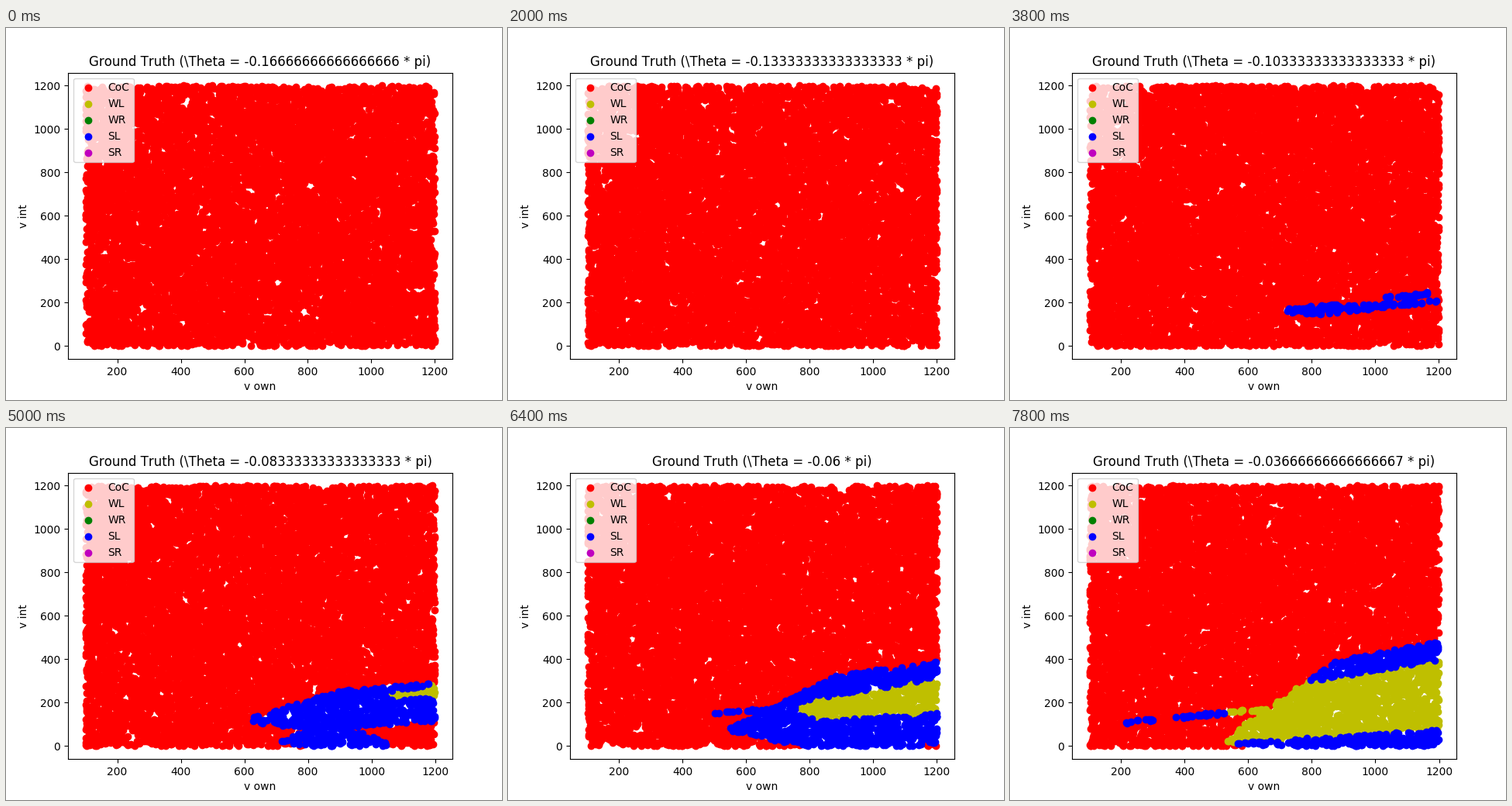
Write a matplotlib script that moves like this. It is 640 px wide and 480 px high and loops after 8 s.

```python
import numpy as np
import matplotlib.pyplot as plt
from matplotlib.animation import FuncAnimation

FRAMES, STEP_MS, POINTS = 40, 200, 10000
MARGIN = 0.05

plt.rcParams["text.kerning_factor"] = 6


def above(v):
    return np.maximum(v, 0)


def main_zone(k, x, y):
    """Alert wedge: steep edge from its tip, then a gentle slope after a knee."""
    t = (k - 19) / 20
    tip = 524 + 190 * (1 - t) ** 2
    rise = 170 - 130 * t + (0.2 + 0.8 * t) * (x - tip)
    knee = 192 + 198 * t + (0.05 + 0.23 * t) * (x - 860)
    floor = (145 - 240 * t + (0.1 + 0.3 * t) * above(830 - x)
             + 0.17 * (1 - t) * above(x - 830))
    return (x > tip) & (y < np.minimum(rise, knee)) & (y > floor)


def sliver(k, x, y):
    """Thin streak that widens sideways until the wedge swallows it."""
    line = 222 + 0.14 * (x - 1015)
    return (abs(x - 1095) < 40 * (k - 17)) & (abs(y - line) < 5)


def lower_lobe(k, x, y):
    """Parabolic bump growing from the bottom edge."""
    s = np.clip((k - 21) / 4, 0.01, 1.5)
    top = 80 * s * (1 - ((x - 875) / (190 * s)) ** 2)
    return (y < top) & (y > 0.25 * (800 - x))


def weak_zone(k, x, y):
    """Wedge opening leftwards inside the alert zone."""
    w = (k - 25) / 14
    tip = 985 - 455 * w
    top = 235 + 113 * w * w + 0.25 * (x - 1000)
    low = 206 - 148 * w + 0.1 * (x - 1000) + (1 - w) * above(tip + 80 - x)
    return (x > tip) & (y < top) & (y > low)


def sample(k):
    rng = np.random.default_rng(100 + k)
    x = rng.uniform(100, 1200, POINTS)
    y = rng.uniform(0, 1200, POINTS)
    core = main_zone(k, x, y) | sliver(k, x, y)
    weak = core & weak_zone(k, x, y)
    strong = (core | lower_lobe(k, x, y)) & ~weak
    return np.column_stack([x, y]), weak, strong


fig, ax = plt.subplots(figsize=(6.4, 4.8), dpi=100)
sets = {name: ax.scatter([], [], c=color, label=name)
        for name, color in zip(["CoC", "WL", "WR", "SL", "SR"], "rygbm")}
ax.set(xlabel="v own", ylabel="v int")
ax.legend(loc="upper left")
title = ax.set_title("")


def draw(k):
    pts, weak, strong = sample(k)
    sets["CoC"].set_offsets(pts[~(weak | strong)])
    sets["WL"].set_offsets(pts[weak])
    sets["SL"].set_offsets(pts[strong])
    low, high = pts.min(axis=0), pts.max(axis=0)
    pad = MARGIN * (high - low)
    ax.set(xlim=(low[0] - pad[0], high[0] + pad[0]),
           ylim=(low[1] - pad[1], high[1] + pad[1]))
    title.set_text(rf"Ground Truth (\Theta = {(k - 50) / 300} * pi)")
    return [*sets.values(), title]


anim = FuncAnimation(fig, draw, frames=FRAMES, interval=STEP_MS,
                     init_func=lambda: draw(0), repeat=True)
plt.show()
```
